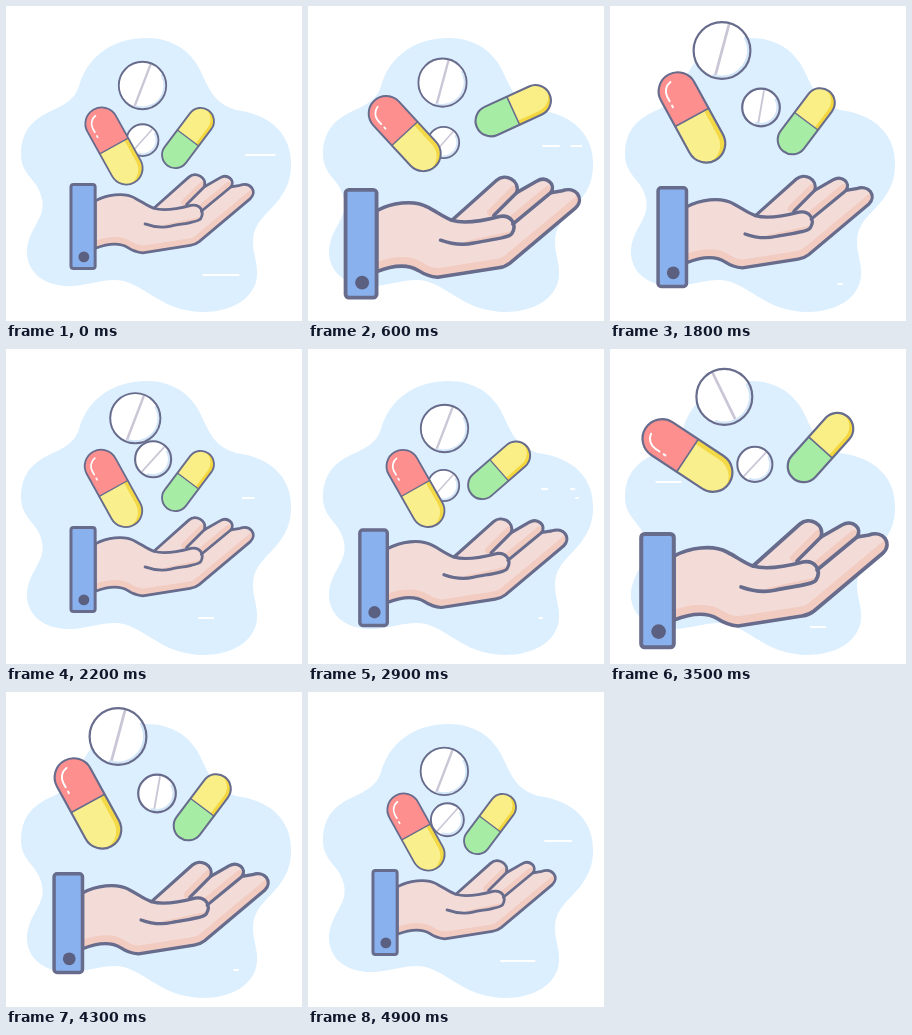
Animation of 296 by 315 pixels, one loop 5 s. Source, as an HTML page with a canvas:

```html
<!DOCTYPE html>
<html lang="en">
<head>
<meta charset="utf-8">
<title>Pills over a hand</title>
<style>
html, body { margin: 0; width: 100%; height: 100%; overflow: hidden; background: #fff; }
canvas { display: block; width: 296px; height: 315px; }
</style>
</head>
<body>
<canvas id="stage"></canvas>
<script>
const W = 296, H = 315, LOOP = 2500, STEP = 100;
const INK = '#676b8c', SKIN = '#f3dcd8', SHADE = '#f2cbc1';
const canvas = document.getElementById('stage');
const ctx = canvas.getContext('2d');
const dpr = window.devicePixelRatio || 1;
canvas.width = W * dpr;
canvas.height = H * dpr;

const blob = new Path2D('M138 32C166 31 184 45 193 62C203 82 207 97 230 104C264 108 285 128 285 157C286 190 262 202 252 218C248 224 247 230 247 236C247 248 252 258 251 270C249 293 225 306 197 306C163 305 150 290 128 279C108 268 92 278 66 280C38 281 20 266 21 244C23 221 40 213 36 193C32 172 14 170 15 146C16 122 30 112 45 105C60 98 69 93 73 80C81 52 104 33 138 32Z');
const palm = new Path2D('M64 207C79 199 102 195 117 203C127 208 134 214 143 217L190 175C199 167 215 175 211 188L232 176C242 170 253 179 247 188L259 186C273 181 283 194 273 204L204 262Q199 266 192 267L128 277Q117 276 108 270Q92 260 64 271Z');
const underside = new Path2D('M281 198L204 262Q199 266 192 267L128 277Q117 276 108 270Q92 260 64 271');
const folds = new Path2D('M211 188L187 212M247 188L207 221');
const thumb = new Path2D('M143 217C156 221 174 218 193 213C205 211 212 221 206 231C203 236 179 238 166 241C153 244 142 242 131 238');

const clamp = x => Math.min(1, Math.max(0, x));
const ease = x => (1 - Math.cos(Math.PI * clamp(x))) / 2;
const ramp = (t, a, b) => ease((t - a) / (b - a));
const mix = (a, b, p) => a + (b - a) * p;

// Rise, hold and fall; the fall may run past the end of the cycle.
function lift(t, [r0, r1, f0, f1]) {
  const at = x => ramp(x, r0, r1) - ramp(x, f0, f1);
  return Math.max(at(t), at(t + LOOP));
}

function keyed(t, keys) {
  for (let i = 1; i < keys.length; i++) {
    const [a, v] = keys[i - 1], [b, w] = keys[i];
    if (t < b) return mix(v, w, ramp(t, a, b));
  }
  return 0;
}

function stroke(color, width, path) {
  ctx.strokeStyle = color;
  ctx.lineWidth = width;
  path ? ctx.stroke(path) : ctx.stroke();
}

function line(x0, y0, x1, y1, color, width) {
  ctx.beginPath();
  ctx.moveTo(x0, y0);
  ctx.lineTo(x1, y1);
  stroke(color, width);
}

function capsule({ len, wide, left, right, edge, side }) {
  const x = len / 2, r = wide / 2;
  const body = new Path2D();
  body.roundRect(-x, -r, len, wide, r);
  ctx.save();
  ctx.clip(body);
  ctx.fillStyle = left;
  ctx.fillRect(-x, -r, x, wide);
  ctx.fillStyle = right;
  ctx.fillRect(0, -r, x, wide);
  ctx.beginPath();
  ctx.rect(0, -r, x, wide);
  ctx.clip();
  // The edge is what a copy of the body, moved inwards, leaves uncovered.
  const rest = new Path2D();
  rest.rect(0, -r, x, wide);
  rest.roundRect(-x, -r - side * r * 0.28, len - 1, wide, r);
  ctx.fillStyle = edge;
  ctx.fill(rest, 'evenodd');
  ctx.restore();
  line(0, -r, 0, r, INK, 1.6);
  stroke(INK, 2.2, body);
  if (side < 0) {
    const y = r * 0.62;
    ctx.beginPath();
    ctx.arc(-x + r, 0, y, Math.PI * 0.95, Math.PI * 0.5, true);
    ctx.lineTo(-x + r + 5, y);
    stroke('#fff', 2);
    line(-x + r + 10, y, -x + r + 12, y, '#fff', 2);
  }
}

function tablet({ r }) {
  ctx.beginPath();
  ctx.arc(0, 0, r, 0, 7);
  ctx.fillStyle = '#fff';
  ctx.fill();
  line(-r + 2, 0, r - 2, 0, '#cbc6d6', r * 0.1);
}

function rim({ r }) {
  ctx.beginPath();
  ctx.arc(0, 0, r - 2.2, -0.5, 1.9);
  stroke('#d3e6f7', 2.4);
  ctx.beginPath();
  ctx.arc(0, 0, r, 0, 7);
  stroke(INK, 2.2);
}

const wobble = [[0, 0], [550, 32], [1030, -11], [1500, 0]];
const flip = gain => wobble.map(([t, v]) => [t, v * gain]);
const pills = [
  { draw: tablet, r: 18.8, from: [135.5, 136.5], to: [151, 101.5], angle: -48,
    time: [660, 1260, 2000, 2600], swing: [[0, 0], [740, 3], [1140, -32], [1500, 0]] },
  { draw: tablet, r: 28.4, from: [136.5, 79.5], to: [112, 44.5], angle: -69,
    time: [480, 1130, 1800, 2430], swing: [[0, 0], [520, -47], [920, 5], [1320, -6], [1700, 0]] },
  { draw: capsule, len: 100, wide: 39, left: '#fd8f8f', right: '#f9ef8d', edge: '#f4d947', side: -1,
    from: [108, 140], to: [77.5, 106.5], angle: 61,
    time: [350, 950, 1650, 2250], swing: flip(-1) },
  { draw: capsule, len: 82.3, wide: 31.8, left: '#a6eca4', right: '#f9ef86', edge: '#f4d73f', side: 1,
    from: [182, 132], to: [210.5, 98.5], angle: -53,
    time: [170, 770, 1500, 2100], swing: flip(1) }
];

function drawPill(pill, t) {
  const p = lift(t, pill.time), size = mix(0.835, 1, p);
  const turn = pill.angle + keyed(t - pill.time[0], pill.swing);
  ctx.save();
  ctx.translate(mix(pill.from[0], pill.to[0], p), mix(pill.from[1], pill.to[1], p));
  ctx.scale(size, size);
  ctx.save();
  ctx.rotate(turn * Math.PI / 180);
  pill.draw(pill);
  ctx.restore();
  if (pill.r) rim(pill);
  ctx.restore();
}

function drawHand(t) {
  const k = mix(1 / 1.348, 1, lift(t, [100, 800, 1500, 2100]));
  ctx.save();
  ctx.translate(162, 160);
  ctx.scale(k, k);
  ctx.translate(-162, -160);

  ctx.fillStyle = SKIN;
  ctx.fill(palm);
  ctx.save();
  ctx.clip(palm);
  stroke(SHADE, 19, underside);
  ctx.translate(-3, -3);
  stroke(SHADE, 8, folds);
  ctx.restore();
  ctx.fillStyle = SKIN;
  ctx.fill(thumb);
  ctx.save();
  ctx.clip(thumb);
  line(206, 233, 160, 243, SHADE, 9);
  ctx.restore();
  for (const path of [palm, folds, thumb]) stroke(INK, 3.7, path);

  ctx.beginPath();
  ctx.roundRect(31.2, 185, 32.6, 113.3, 3.5);
  ctx.fillStyle = '#89b1ee';
  ctx.fill();
  stroke(INK, 4);
  ctx.beginPath();
  ctx.arc(48.6, 282.6, 7.3, 0, 7);
  ctx.fillStyle = '#5b5f80';
  ctx.fill();
  ctx.restore();
}

// Each dash: start x, end x, y, begin, end.
const dashes = [
  [237, 270, 149, 1960, 3000],
  [193, 234, 269, 1950, 3000],
  [234, 252, 140, 250, 950],
  [263, 274, 140, 250, 950],
  [44, 72, 133, 600, 1380],
  [52, 67, 141, 1000, 1800],
  [201, 232, 278, 610, 1980]
];

function drawDash([x0, x1, y, begin, end], t) {
  const u = (t - begin) / (end - begin);
  if (u <= 0 || u >= 1) return;
  const tail = mix(x0, x1, ease((u - 0.4) / 0.6));
  const head = mix(x0, x1, ease(u / 0.6));
  line(tail, y, head, y, '#fff', 2.2);
}

function render(t) {
  ctx.setTransform(dpr, 0, 0, dpr, 0, 0);
  ctx.lineCap = ctx.lineJoin = 'round';
  ctx.fillStyle = '#fff';
  ctx.fillRect(0, 0, W, H);
  ctx.fillStyle = '#dceffe';
  ctx.fill(blob);
  for (const d of dashes) {
    drawDash(d, t);
    drawDash(d, t + LOOP);
  }
  drawHand(t);
  for (const pill of pills) drawPill(pill, t);
}

const start = performance.now();
function tick() {
  const t = Math.max(0, performance.now() - start);
  render(Math.floor(t / STEP) * STEP % LOOP);
  requestAnimationFrame(tick);
}
tick();
</script>
</body>
</html>
```
